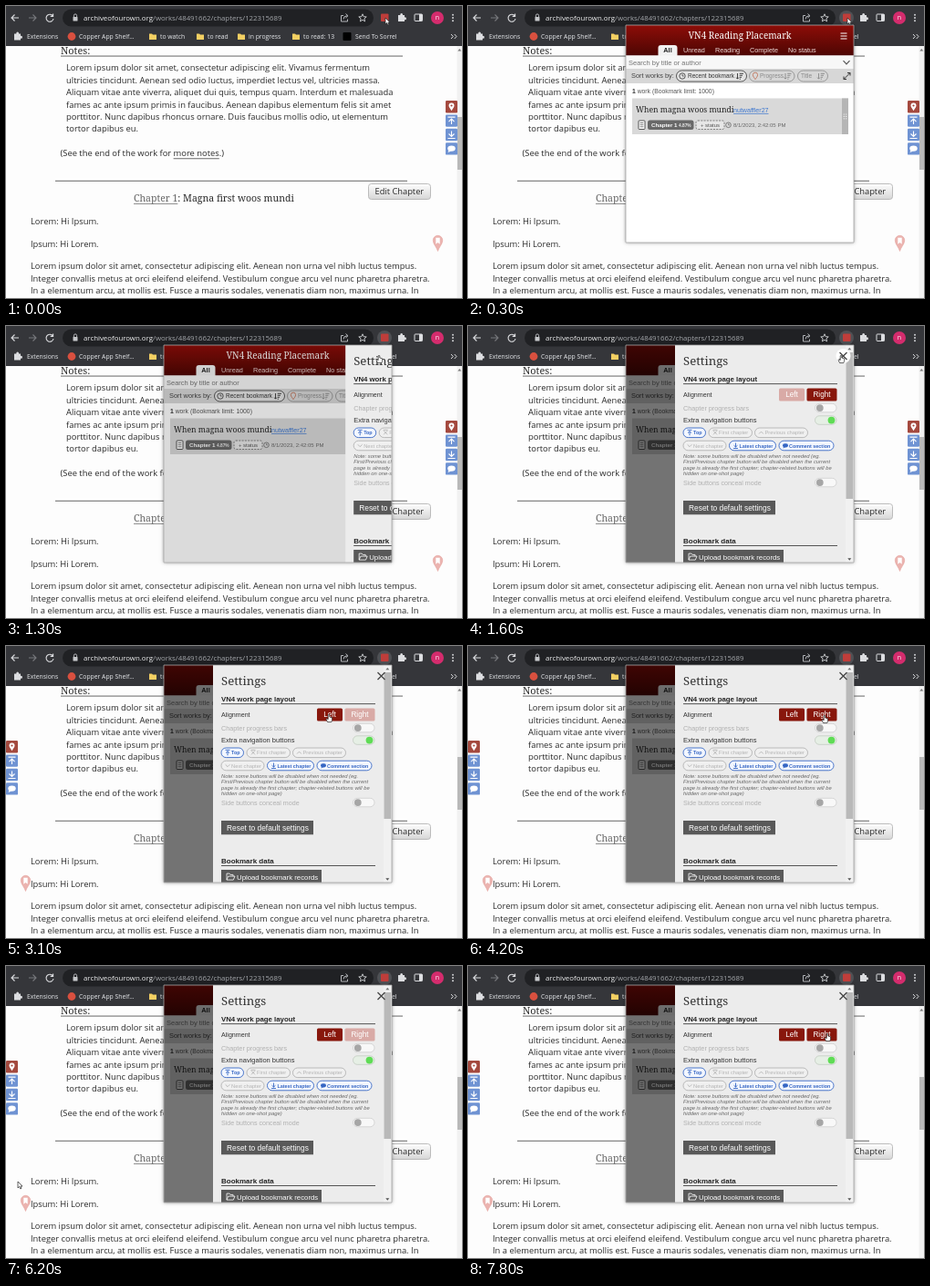
Recreate the animation shown at these times as an HTML page with a canvas. Size 500 px wide and 321 px high, loop 8000 ms.

```html
<!DOCTYPE html>
<html lang="en">
<head>
<meta charset="utf-8">
<title>Progress bookmark settings</title>
<style>
html, body { margin: 0; width: 100%; height: 100%; overflow: hidden; background: #fff; }
canvas { display: block; width: 500px; height: 321px; }
</style>
</head>
<body>
<canvas id="stage"></canvas>
<script>
const W = 500, H = 321, LOOP = 8000;
const canvas = document.getElementById('stage');
const ctx = canvas.getContext('2d');
const dpr = window.devicePixelRatio || 1;
canvas.width = W * dpr;
canvas.height = H * dpr;

const BODY = '"Open Sans", "Noto Sans", sans-serif';
const UI = '"Liberation Sans", Arial, sans-serif';
const SERIF = '"Noto Serif", Georgia, serif';
const RED = '#88170c', FADED = '#d9aaa6', INK = '#2a2a2a', BLUE = '#3767c4';

// ---- helpers ----
function text(s, x, y, size, color, family = UI, style = '', align = 'left') {
  ctx.font = `${style} ${size}px ${family}`;
  ctx.fillStyle = color;
  ctx.textAlign = align;
  ctx.fillText(s, x, y);
  return ctx.measureText(s).width;
}
function rect(x, y, w, h, color) {
  ctx.fillStyle = color;
  ctx.fillRect(x, y, w, h);
}
function box(x, y, w, h, r, fill, stroke, lw = 0.7, dash = []) {
  ctx.beginPath();
  ctx.roundRect(x, y, w, h, r);
  if (fill) { ctx.fillStyle = fill; ctx.fill(); }
  if (stroke) {
    ctx.setLineDash(dash);
    ctx.strokeStyle = stroke; ctx.lineWidth = lw; ctx.stroke();
    ctx.setLineDash([]);
  }
}
function disc(x, y, r, fill, stroke, lw = 0.8) {
  ctx.beginPath();
  ctx.arc(x, y, r, 0, Math.PI * 2);
  if (fill) { ctx.fillStyle = fill; ctx.fill(); }
  if (stroke) { ctx.strokeStyle = stroke; ctx.lineWidth = lw; ctx.stroke(); }
}
function path(d, x, y, color, lw = 1, fill) {
  ctx.save();
  ctx.translate(x, y);
  const p = new Path2D(d);
  if (fill) { ctx.fillStyle = fill; ctx.fill(p); }
  if (color) { ctx.strokeStyle = color; ctx.lineWidth = lw; ctx.stroke(p); }
  ctx.restore();
}
function fade(y0, y1, a, b) {
  const g = ctx.createLinearGradient(0, y0, 0, y1);
  g.addColorStop(0, a);
  g.addColorStop(1, b);
  return g;
}
function clock(x, y, r, color) {
  disc(x, y, r, null, color);
  path(`M0 ${-r * 0.6}V0H${r * 0.55}`, x, y, color, 0.7);
}

// ---- browser bars ----
const PUZZLE = 'M-4 -2H-1.6A1.4 1.4 0 1 1 0.9 -2H3V0.4A1.4 1.4 0 1 1 3 3V5H-4Z';
function folder(x) {
  path('M-4 -3H-1L0 -2H4V3.5H-4Z', x, 33.5, null, 0, '#f3cf62');
}
function browser(s) {
  rect(0, 0, W, 44, '#35363a');
  box(62, 3.5, 341, 19, 9.5, '#202124');
  path('M4 0H-4M-0.5 -3.5L-4 0L-0.5 3.5', 10, 13, '#dcdde0', 1.1);
  path('M-4 0H4M0.5 -3.5L4 0L0.5 3.5', 29, 13, '#77787c', 1.1);
  path('M3 -2.5A4 4 0 1 0 4 1M3.6 -4.5V-1.6H0.7', 48, 13, '#dcdde0', 1.1);
  box(73.5, 12, 5, 4.5, 0.6, '#c5c7ca');
  path('M-1.6 0V-1.5A1.6 1.6 0 0 1 1.6 -1.5V0', 76, 12, '#c5c7ca', 0.9);
  const host = 'archiveofourown.org';
  const w = text(host, 85, 16, 7.85, '#f0f1f2', BODY);
  text('/works/48491662/chapters/122315689', 85 + w, 16, 7.85, '#a4a7ab', BODY);

  path('M-1 -2.5H-3.5V4H3.5V1.5M-1 1.5Q-1 -2 3 -2.2M1.5 -4.5L4 -2.2L1.5 0', 371, 13, '#c5c7ca', 0.9);
  if (s.starHover) disc(391, 13, 8, '#3f4145');
  path('M0 -4.2L1.2 -1.3L4.2 -1.1L1.9 0.9L2.6 3.9L0 2.3L-2.6 3.9L-1.9 0.9L-4.2 -1.1L-1.2 -1.3Z', 391, 13, '#d4d6d9', 0.9);
  if (s.popup) disc(415, 13, 8, '#505155');
  box(411, 8.5, 8.5, 8.5, 1, '#bf3d3a');
  path(PUZZLE, 434, 12, null, 0, '#dcdde0');
  box(448, 9, 8.5, 7.5, 0.8, null, '#dcdde0', 1);
  rect(453, 9, 3.5, 7.5, '#dcdde0');
  disc(473, 13, 7, '#d42c6d');
  text('n', 473, 15.2, 7, '#fff', BODY, '', 'center');
  for (const y of [9.7, 13, 16.3]) disc(490, y, 0.95, '#dcdde0');

  const mark = (label, x) => text(label, x, 36.2, 6.8, '#e8eaed', BODY);
  path(PUZZLE, 13, 32.5, null, 0, '#dcdde0');
  mark('Extensions', 23);
  disc(72, 33.5, 4.4, '#d9503f');
  mark('Copper App Shelf...', 80);
  for (const [label, x] of [['to watch', 169], ['to read', 221], ['in progress', 266], ['to read: 13', 326]]) {
    folder(x - 8);
    mark(label, x);
  }
  box(369.5, 29, 9, 9, 1, '#000');
  mark('Send To Sorrel', 383);
  path('M-3 -2.5L-0.7 0L-3 2.5M0.7 -2.5L3 0L0.7 2.5', 491, 33.5, '#dcdde0', 1);
}

// ---- web page ----
const NOTES = [
  'Lorem ipsum dolor sit amet, consectetur adipiscing elit. Vivamus fermentum',
  'ultricies tincidunt. Aenean sed odio luctus, imperdiet lectus vel, ultricies massa.',
  'Aliquam vitae ante viverra, aliquet dui quis, tempus quam. Interdum et malesuada',
  'fames ac ante ipsum primis in faucibus. Aenean dapibus elementum felis sit amet',
  'porttitor. Nunc dapibus rhoncus ornare. Duis faucibus mollis odio, ut elementum',
  'tortor dapibus eu.'
];
const STORY = [
  'Lorem ipsum dolor sit amet, consectetur adipiscing elit. Aenean non urna vel nibh luctus tempus.',
  'Integer convallis metus at orci eleifend eleifend. Vestibulum congue arcu vel nunc pharetra pharetra.',
  'In a elementum arcu, at mollis est. Fusce a mauris sodales, venenatis diam non, maximus urna. In'
];
function page() {
  rect(0, 0, W, H, '#fdfdfd');
  const say = (s, x, y) => text(s, x, y, 9.4, INK, BODY);
  text('Notes:', 60, 53, 10.9, INK, SERIF);
  rect(60, 54.6, 375, 0.9, '#555');
  NOTES.forEach((s, i) => say(s, 66, 71.4 + i * 13.4));
  let x = 59.5;
  x += say('(See the end of the work for ', x, 164.6);
  const link = say('more notes', x, 164.6);
  rect(x, 167.4, link, 0.8, '#444');
  say('.)', x + link, 164.6);
  rect(54, 191.8, 386, 0.9, '#555');

  const w = text('Chapter 1', 140, 215, 10.5, '#666', SERIF);
  rect(140, 217, w, 0.8, '#777');
  text(': Magna first woos mundi', 140 + w, 215, 10.5, INK, SERIF);
  box(397.5, 195.5, 68, 17, 3, fade(195, 213, '#fff', '#d5d5d5'), '#b5b5b5', 0.9);
  text('Edit Chapter', 404.5, 207.4, 9.3, INK, BODY);

  say('Lorem: Hi Ipsum.', 27, 239.8);
  say('Ipsum: Hi Lorem.', 27, 264.6);
  STORY.forEach((s, i) => say(s, 27, 289.4 + i * 13.4));

  rect(494.5, 44, 5.5, H, '#f1f1f1');
  rect(495, 122, 5, 58, '#b9b9b9');
  path('M-2 1.5L0 -1L2 1.5Z', 497.3, 48, null, 0, '#777');
}

const PIN = 'M0 9C-1.5 4 -5.2 1.5 -5.2 -3A5.2 5.2 0 0 1 5.2 -3C5.2 1.5 1.5 4 0 9Z';
function sideTools(left) {
  const x = left ? 0 : 482;
  for (let i = 0; i < 4; i++) {
    const y = 104 + i * 15.4, cx = x + 6.5, cy = y + 6.7;
    box(x, y, 13, 13.4, 1.2, i ? '#6f93d3' : '#a4493e');
    if (i === 0) {
      path('M0 4.5C-1 2 -3 1 -3 -1.3A3 3 0 0 1 3 -1.3C3 1 1 2 0 4.5Z', cx, cy, null, 0, '#fff');
      disc(cx, cy - 1.2, 1.1, '#a4493e');
    } else if (i === 3) {
      ctx.beginPath();
      ctx.ellipse(cx, cy - 0.3, 4.2, 3.2, 0, 0, 7);
      ctx.fillStyle = '#fff';
      ctx.fill();
      path('M-3 1L-3.8 4L-0.5 2.5Z', cx, cy, null, 0, '#fff');
    } else {
      const k = i === 1 ? 1 : -1;
      path(`M-4 ${-4 * k}H4M0 ${4 * k}V${-2 * k}M-3 ${k}L0 ${-2 * k}L3 ${k}`, cx, cy, '#fff', 1.1);
    }
  }
  const px = left ? 21.5 : 473.5;
  path(PIN, px, 260.5, '#e5a29d', 0.6, '#ebb4b0');
  path('M-2.2 -5.8H2.2V1.2L0 -0.6L-2.2 1.2Z', px, 260.5, null, 0, '#fff');
}

// ---- popup ----
function sortPill(x, w, label, tx, on) {
  const c = on ? '#333' : '#8a8a8a';
  box(x, 71, w, 12, 6, on ? '#e4e4e4' : null, c, 0.8);
  text(label, tx, 79.3, 6.5, c);
  const ex = x + w - 10;
  path('M0 -3V3M-1.4 1.6L0 3.2L1.4 1.6M2.2 -2.7H6.5M2.2 -0.7H5.5M2.2 1.3H4.5M2.2 3.2H3.5', ex, 77, c, 0.9);
}
function library() {
  rect(173, 21, 250, 240, '#fff');
  rect(173, 21, 250, 33.5, fade(21, 54, '#8d0d08', '#4e0603'));
  text('VN4 Reading Placemark', 298, 36, 9.9, '#fff', SERIF, '', 'center');
  for (const y of [30, 33, 36]) rect(408.5, y - 0.5, 7, 1, '#fff');
  box(208.5, 43, 21, 13, [3, 3, 0, 0], '#f1f1f1');
  text('All', 219, 51.3, 7.4, '#222', UI, 'bold', 'center');
  for (const [s, x] of [['Unread', 236], ['Reading', 271], ['Complete', 309], ['No status', 351]])
    text(s, x, 51.3, 7.25, '#f0dcdb');
  rect(173, 54.5, 250, 14.5, '#f7f7f7');
  text('Search by title or author', 176, 64.6, 7.5, '#757575');
  path('M-3.5 -1.8L0 1.8L3.5 -1.8', 415, 62, '#555', 1.2);
  rect(173, 69, 250, 16, '#d7d7d7');
  text('Sort works by:', 179, 79.4, 7.4, '#444');
  sortPill(228.5, 77, 'Recent bookmark', 241, true);
  clock(235, 77, 3.2, '#333');
  sortPill(308.5, 49.5, 'Progress', 320, false);
  path('M0 4C-1 2 -2.6 1 -2.6 -1A2.6 2.6 0 0 1 2.6 -1C2.6 1 1 2 0 4Z', 315, 76.7, '#c1785f', 0.9);
  sortPill(361.5, 33, 'Title', 365, false);
  path('M0.5 -3.5H3.5V-0.5M-0.5 3.5H-3.5V0.5M3.5 -3.5L-3.5 3.5', 415.5, 77, '#333', 1);

  const w = text('1', 180, 96, 6.8, '#333', UI, 'bold');
  text(' work (Bookmark limit: 1000)', 180 + w, 96, 6.8, '#555');
  rect(180, 101.5, 237, 39.5, '#d9d9d9');
  rect(410, 101.5, 7, 39.5, '#b5b5b5');
  for (let i = 0; i < 6; i++) disc(412.3 + (i % 2) * 2.4, 119 + (i >> 1) * 2.4, 0.6, '#fff');
  text('When magna woos mundi', 184, 117, 8.6, '#222', SERIF);
  const u = text('nutwaffler27', 291, 116.8, 7.1, '#3e77cf');
  rect(291, 118, u, 0.7, '#3e77cf');
  box(187, 126, 7, 9.5, 0.8, '#fff', '#444', 0.9);
  for (let i = 0; i < 3; i++) rect(188.6, 128.3 + i * 2.1, 3.8, 0.7, '#444');
  box(197, 125.5, 50.5, 10.5, 2.5, '#686868');
  text('Chapter 1', 201, 133, 6.2, '#fff', UI, 'bold');
  text('4.87%', 231, 133, 4.8, '#eee', UI, 'bold');
  box(250, 126, 31, 9.5, 2, '#e6e6e6', '#666', 0.8, [2, 1.3]);
  text('+ status', 265.5, 132.8, 6, '#555', UI, '', 'center');
  clock(285.5, 130.8, 2.8, '#666');
  text('8/1/2023, 2:42:05 PM', 291, 133.1, 6, '#666');
}

function toggle(y, on) {
  box(380.5, y, 23.5, 9.5, 4.75, on ? '#e6efe5' : '#f8f8f8', on ? '#bcc6bb' : '#c9c9c9', 0.7);
  disc(on ? 398.5 : 385.8, y + 4.75, 3.9, on ? '#5fdc55' : '#a6a6a6');
}
function chip(x, y, w, label, icon, on) {
  const c = on ? BLUE : '#b3b3b3';
  box(x, y, w, 10.6, 5.3, on ? '#f3f7ff' : '#f0f0f0', c, 0.9);
  if (icon === 'say') {
    box(x + 4, y + 3, 6, 4.2, 2.1, c);
    path('M0 0L-0.6 2L2 0Z', x + 5, y + 6.6, null, 0, c);
  } else {
    path(icon, x + 7, y + 5.3, c, 0.9);
  }
  text(label, x + 11, y + 7.4, on ? 5.4 : 5.8, c, UI, on ? 'bold' : '');
}
const HINT = [
  'Note: some buttons will be disabled when not needed (eg.',
  'First/Previous chapter button will be disabled when the current',
  'page is already the first chapter; chapter-related buttons will be',
  'hidden on one-shot page)'
];
function settings(s) {
  rect(227, 21, 196, 240, '#ececec');
  rect(414, 21, 8.5, 240, '#f1f1f1');
  rect(414.5, 29, 7.5, 161, '#b9b9b9');
  path('M-2 1.2L0 -1.2L2 1.2Z', 418.3, 25, null, 0, '#777');
  path('M-2 -1.2L0 1.2L2 -1.2Z', 418.3, 256.5, null, 0, '#555');
  text('Settings', 236, 43, 13.2, '#333', SERIF);
  if (s.closeHover) disc(411.5, 33, 8, '#fff');
  path('M-4 -4L4 4M4 -4L-4 4', 411.5, 33, '#444', 1.3);

  text('VN4 work page layout', 236, 61.2, 7.8, '#222', UI, 'bold');
  rect(236, 63.2, 169, 0.9, '#444');
  text('Alignment', 236, 78, 7.1, '#333');
  box(341, 68.5, 28, 14, 1.5, s.leftOn ? RED : FADED);
  text('Left', 355, 78.4, 8.2, '#fff', UI, '', 'center');
  box(371.5, 68.5, 33, 14, 1.5, s.rightOn ? RED : FADED);
  text('Right', 388, 78.4, 8.2, '#fff', UI, '', 'center');
  text('Chapter progress bars', 236, 92.6, 7.25, '#b0b0b0');
  toggle(85.3, false);
  text('Extra navigation buttons', 236, 106.2, 7.5, '#333');
  toggle(98.8, true);

  const up = 'M-2.5 -3H2.5M0 3V-1.6M-2 0.3L0 -1.6L2 0.3';
  const down = 'M-2.5 3H2.5M0 -3V1.6M-2 -0.3L0 1.6L2 -0.3';
  chip(236, 112, 24.5, 'Top', up, true);
  chip(264, 112, 47.5, 'First chapter', 'M-2 -2L2 2M2 -2L-2 2M-2.5 -3H2.5', false);
  chip(314.5, 112, 58, 'Previous chapter', 'M-2.4 1.2L0 -1.2L2.4 1.2', false);
  chip(236, 126.2, 47, 'Next chapter', 'M-2.4 -1.2L0 1.2L2.4 -1.2', false);
  chip(286.5, 126.2, 51, 'Latest chapter', down, true);
  chip(341, 126.2, 60, 'Comment section', 'say', true);
  HINT.forEach((l, i) => text(l, 236, 145 + i * 6.25, 5.85, '#666', UI, 'italic'));
  text('Side buttons conceal mode', 236, 174.6, 7.1, '#b0b0b0');
  toggle(167.3, false);

  rect(236, 192, 101, 15.3, '#595959');
  text('Reset to default settings', 242, 202.8, 8.4, '#fff');
  text('Bookmark data', 236, 238.8, 8, '#222', UI, 'bold');
  rect(236, 241, 169, 0.9, '#444');
  rect(236, 246, 110, 15, '#595959');
  path('M-4 3.5V-3.5H-1L0 -2.2H3V-0.5M-4 3.5L-2.3 -0.5H5L3.3 3.5Z', 246, 253.6, '#fff', 0.8);
  text('Upload bookmark records', 253, 256.6, 7.8, '#fff');
}
function popup(s) {
  ctx.save();
  ctx.shadowColor = 'rgba(0,0,0,.45)';
  ctx.shadowBlur = 4 * dpr;
  rect(173, 21, 250, 239, '#fff');
  ctx.restore();
  ctx.save();
  ctx.beginPath();
  ctx.rect(173, 21, 250, 239);
  ctx.clip();
  library();
  if (s.slide > 0) {
    rect(173, 21, 250, 240, `rgba(0,0,0,${0.55 * s.slide})`);
    ctx.translate(196 * (1 - s.slide), 0);
    settings(s);
  }
  ctx.restore();
  box(173, 21, 250, 239, 0, null, '#aaa', 0.8);
}

// ---- pointer: time, x, y ----
const TRACK = [
  [0, 416, 13], [300, 416, 13], [700, 394, 16], [900, 394, 16], [1200, 409, 32],
  [1800, 409, 32], [2300, 354, 75], [3300, 354, 75], [3900, 391, 76], [4500, 391, 76],
  [5300, 7, 109], [5400, 7, 109], [6200, 13, 237], [6300, 13, 237], [7200, 330, 120], [7700, 394, 74], [8000, 394, 74]
];
const clamp = v => Math.max(0, Math.min(1, v));
const ease = v => v * v * (3 - 2 * v);
function pointerAt(t) {
  const i = Math.max(1, TRACK.findIndex(k => k[0] > t));
  const [t0, x0, y0] = TRACK[i - 1], [t1, x1, y1] = TRACK[i];
  const k = ease(clamp((t - t0) / (t1 - t0)));
  return { x: x0 + (x1 - x0) * k, y: y0 + (y1 - y0) * k };
}
function drawPointer(p, hand) {
  if (hand) path('M-0.8 0.8Q0 -0.6 0.8 0.8V3L3.6 3.8V6.5L2.8 8.6H-1.4L-3 5.4L-2.2 4.8L-0.8 5.6Z', p.x, p.y, '#222', 0.7, '#fff');
  else path('M0 0V7L1.6 5.5L2.8 8L4 7.4L2.9 5.1H5Z', p.x, p.y, '#222', 0.7, '#fff');
}

function draw(t) {
  const p = pointerAt(t);
  const over = (x, y, w, h) => p.x >= x && p.x <= x + w && p.y >= y && p.y <= y + h;
  const open = t >= 1200;
  const left = t >= 2700;
  const overLeft = open && over(341, 68, 28, 14);
  const overRight = open && over(371.5, 68, 33, 14);
  const s = {
    popup: t >= 300,
    slide: ease(clamp((t - 1200) / 300)),
    starHover: t > 300 && over(383, 4, 16, 17),
    closeHover: open && over(403, 25, 16, 16),
    leftOn: left || overLeft,
    rightOn: !left || overRight
  };
  ctx.setTransform(dpr, 0, 0, dpr, 0, 0);
  page();
  sideTools(left);
  browser(s);
  if (s.popup) popup(s);
  const onMenu = s.popup && over(404, 26, 14, 14);
  drawPointer(p, overLeft || overRight || onMenu || (left && over(0, 104, 13, 60)));
}

const start = performance.now();
function tick(now) {
  const t = Math.max(0, now - start) % LOOP;
  draw(Math.floor(t / 100) * 100);
  requestAnimationFrame(tick);
}
draw(0);
requestAnimationFrame(tick);
</script>
</body>
</html>
```
